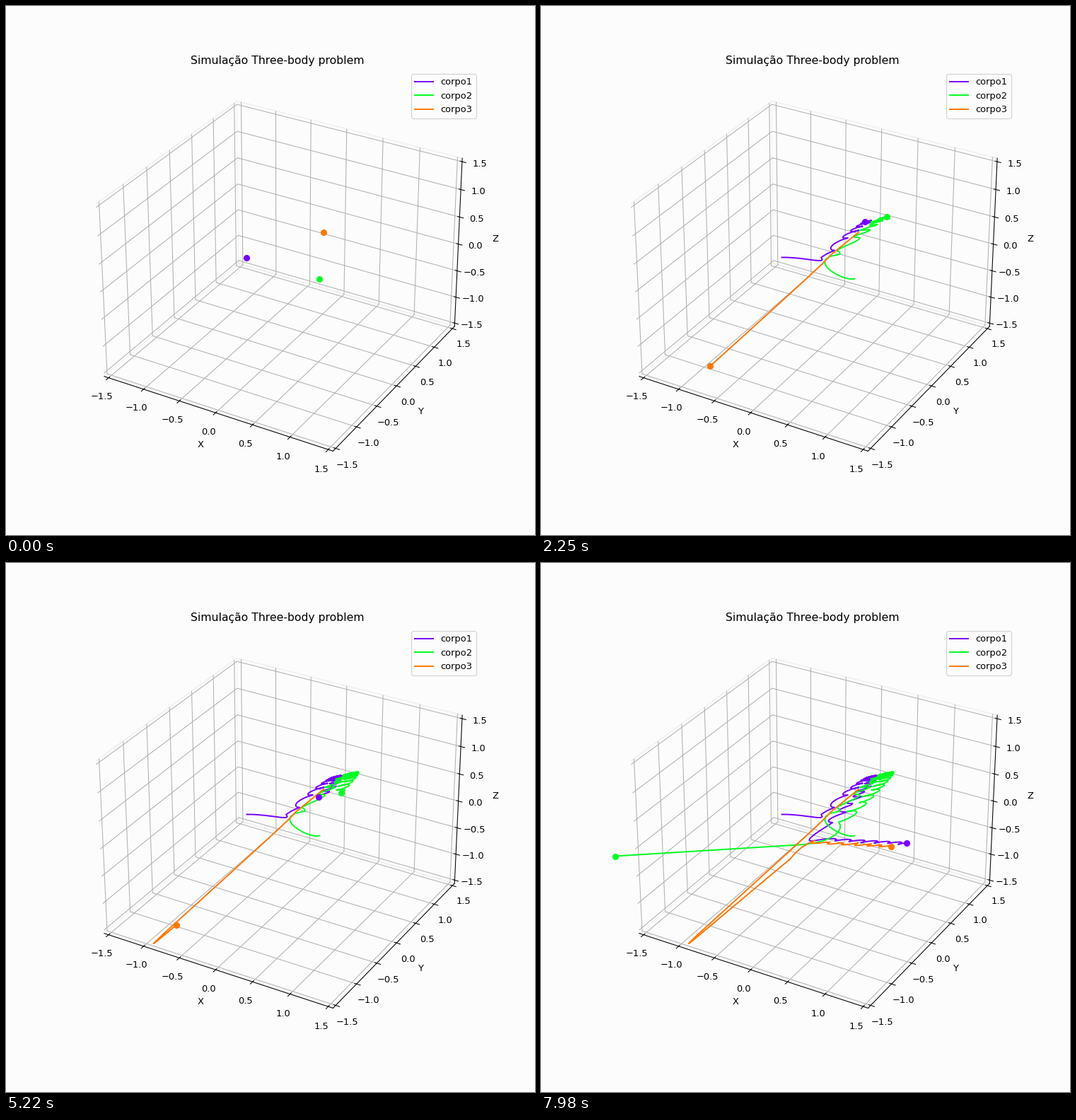
These frames come from a looping animation (748x748 px, 8 s). A matplotlib script:

```python
import numpy as np
import matplotlib.pyplot as plt
from matplotlib.animation import FuncAnimation

SIZE, INCHES = 748, 8
LOOP_MS = 8000
FRAMES = 267
BG = "#fcfcfc"
COLORS = ("#7700ff", "#00ff22", "#ff7700")
NAMES = ("corpo1", "corpo2", "corpo3")

T = np.arange(FRAMES, dtype=float)
BEFORE = T[:, None] <= 208     # until then bodies 1 and 2 are the close pair
FLYBY, CAPTURE, SPLIT, SETTLED = 18, 208, 216, 218


def kepler(phase, far, side, e):
    """Separation on a very thin ellipse; phase 0 is the closest approach."""
    ecc = np.full_like(phase, np.pi)
    for _ in range(40):
        ecc -= (ecc - e * np.sin(ecc) - phase) / (1 - e * np.cos(ecc))
    return np.outer((e - np.cos(ecc)) / (1 + e), far) + np.outer(np.sin(ecc), side)


def turns(period, closest):
    return 2 * np.pi * ((T - closest) / period % 1)


def depart(start, end):
    """Slowing departure after the split."""
    u = np.clip((T - SPLIT) / (266 - SPLIT), 0, None) ** 0.82
    return np.array(start) + np.outer(u, np.subtract(end, start))


def bridge(track, a, b, *bends, start=None, power=1.0):
    """Bezier curve from track[a] (or start) to track[b], eased by power."""
    first = track[a] if start is None else start
    u = (((T[a:b + 1] - a) / (b - a)) ** power)[:, None]
    pts = [np.array(p, dtype=float) for p in (first, *bends, track[b])]
    while len(pts) > 1:
        pts = [p + (q - p) * u for p, q in zip(pts, pts[1:])]
    track[a:b + 1] = pts[0]


def make_tracks():
    # drifting centre of mass, and body 3 falling out and back on a long orbit
    centre = np.array([410.5, 349.6]) + np.outer(T, [-0.108, 0.193])
    outer = kepler(np.interp(T, [18.35, 122, 217.9], [0, np.pi, 2 * np.pi]),
                   (-269, 235), (0, 5.5), e=0.99)
    pair = centre - 0.3 * outer
    inner = kepler(turns(10.46, 197.95), (37, -8), (1, -1.5), e=0.95)

    # bodies 1 and 3 pair up after body 2 is thrown out
    new_pair = depart((378, 392), (506, 398.5))
    new_inner = kepler(turns(7.71, 241.15), (29, -6.5), (0.3, -0.6), e=0.95)

    one = np.where(BEFORE, pair - 0.45 * inner, new_pair + 0.5 * new_inner)
    two = np.where(BEFORE, pair + 0.55 * inner, depart((372, 398), (105, 414.5)))
    three = np.where(T[:, None] <= 214, centre + 0.7 * outer,
                     new_pair - 0.5 * new_inner)

    # fall from rest
    bridge(one, 0, FLYBY, (375, 355), (405, 366), start=(340.5, 355.5), power=2.2)
    bridge(two, 0, FLYBY, (428, 391), (370, 357), start=(443.5, 385.5), power=2.2)
    bridge(three, 0, FLYBY, start=(449, 320), power=2.2)

    # second close encounter
    bridge(one, CAPTURE, SETTLED, (395, 378), (365, 396))
    bridge(two, CAPTURE, SPLIT, (430, 376), (415, 394))
    bridge(three, 214, SETTLED, (366, 400))
    return one, two, three


def draw_box(fig):
    ax = fig.add_subplot(projection="3d")
    half = 1.5 * 25 / 24
    ax.set(xlim=(-half, half), ylim=(-half, half), zlim=(-half, half),
           xlabel="X", ylabel="Y", zlabel="Z")
    ax.set_facecolor(BG)
    for axis in (ax.xaxis, ax.yaxis, ax.zaxis):
        axis.set_ticks(np.arange(-3, 4) / 2)
        axis.set_pane_color(BG)
        axis.pane.set_edgecolor("#eeeeee")
    for color, name in zip(COLORS, NAMES):
        ax.plot([], [], [], color=color, label=name)
    ax.set_title("Simulação Three-body problem")
    ax.legend(loc="upper right", facecolor=BG)


fig = plt.figure(figsize=(INCHES, INCHES), dpi=SIZE / INCHES, facecolor=BG)

# the box never changes, so render it once and keep it as a backdrop
draw_box(fig)
fig.canvas.draw()
backdrop = np.array(fig.canvas.buffer_rgba())
fig.clear()
fig.figimage(backdrop, origin="upper", zorder=-1)

stage = fig.add_axes([0, 0, 1, 1])
stage.set(xlim=(0, SIZE), ylim=(SIZE, 0))
stage.axis("off")
trails = [stage.plot([], [], color=c, lw=1.5, zorder=2)[0] for c in COLORS]
dots = [stage.plot([], [], "o", color=c, ms=6, zorder=3)[0] for c in COLORS]
tracks = make_tracks()


def update(i):
    for track, trail, dot in zip(tracks, trails, dots):
        trail.set_data(track[:i + 1, 0], track[:i + 1, 1])
        dot.set_data(track[i:i + 1, 0], track[i:i + 1, 1])
    return trails + dots


anim = FuncAnimation(fig, update, frames=FRAMES, interval=LOOP_MS / FRAMES,
                     repeat=True, repeat_delay=0)
plt.show()
```
